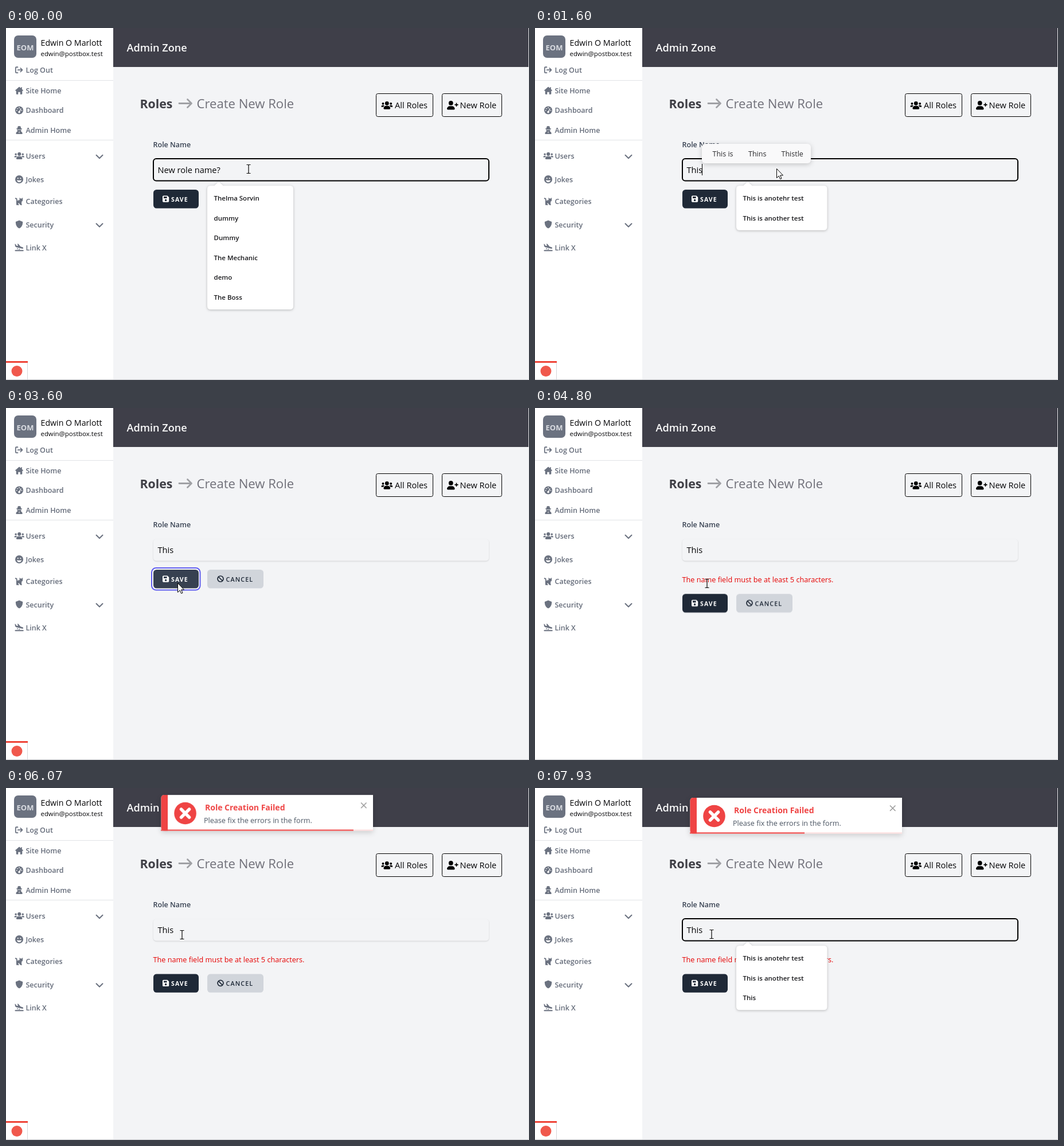
Recreate the animation shown at these times as an HTML page. Size 912x614 px, loop 8000 ms.

```html
<!DOCTYPE html>
<html lang="en">
<head>
<meta charset="utf-8">
<title>Create New Role</title>
<style>
html, body { margin: 0; width: 100%; height: 100%; overflow: hidden; background: #f3f4f6; }
svg { display: block; }
#stage { width: 912px; height: 614px; }
text { font: 400 14.6px "Open Sans", "Noto Sans", sans-serif; fill: #050507; }
.nav { fill: #6b7280; color: #6b7280; }
.nav text { font-weight: 600; font-size: 12.5px; fill: #656c7a; }
.line { fill: none; stroke: currentColor; stroke-width: 2; stroke-linecap: round; stroke-linejoin: round; }
.hole { fill: #fff; }
.list text { font-weight: 600; font-size: 11.5px; fill: #18181b; }
.bar text { font-size: 12.5px; fill: #2b2b2e; }
.btn text { font-weight: 700; font-size: 10.5px; letter-spacing: 1.1px; }
.panel { filter: drop-shadow(0 1px 2px rgba(0,0,0,.25)); }
.bar .panel { filter: drop-shadow(0 2px 4px rgba(0,0,0,.2)); }
.field { filter: drop-shadow(0 1px 1.2px rgba(0,0,0,.14)); }

.btn { animation: drop 8s step-end infinite; }
#save { animation: hover 8s linear infinite; }
#ring { animation: ring 8s linear infinite; }
#toast { animation: toast 8s linear infinite; filter: drop-shadow(0 3px 5px rgba(0,0,0,.16)); }
#left { transform-origin: 270px 0; animation: drain 8s linear infinite; }
#arrow { animation: point 8s linear infinite; }
#beam { animation: beam 8s linear infinite; }

@keyframes drop { 0% { transform: none; } 59.95% { transform: translateY(42.3px); } }
@keyframes hover {
  0%, 33% { fill: #1f2937; }
  35%, 36.6% { fill: #374151; }
  38.4% { fill: #1a2333; }
  40.8%, 59.94% { fill: #374151; }
  59.95%, 100% { fill: #1f2937; }
}
@keyframes ring {
  0%, 36.9% { opacity: 0; }
  39%, 59.94% { opacity: 1; }
  59.95%, 100% { opacity: 0; }
}
@keyframes toast {
  0%, 74.94% { opacity: 0; transform: translateY(-24px); }
  74.95% { opacity: .8; transform: translateY(-20px); }
  75.8% { opacity: 1; transform: translateY(-5.3px); }
  76.7% { opacity: 1; transform: translateY(-1.5px); }
  77.6%, 100% { opacity: 1; transform: none; }
}
@keyframes drain { 0%, 75% { transform: scaleX(341); } 100% { transform: scaleX(195); } }
@keyframes point {
  0%, 26.5% { transform: translate(421px, 245px); }
  27.5% { transform: translate(412px, 259px); }
  29% { transform: translate(383px, 318px); }
  30.4% { transform: translate(350px, 346px); }
  31.9% { transform: translate(318px, 339px); }
  33.1% { transform: translate(301px, 314px); }
  34%, 43.2% { transform: translate(297px, 305px); }
  45%, 100% { transform: translate(299px, 305px); }
}
@keyframes beam {
  0%, 50% { transform: translate(423px, 246px); }
  50.1%, 68.8% { transform: translate(300px, 306px); }
  70% { transform: translate(305px, 290px); }
  71.2% { transform: translate(312px, 266px); }
  72.5%, 88% { transform: translate(307px, 256px); }
  89%, 100% { transform: translate(308px, 255px); }
}
</style>
</head>
<body>
<svg id="stage" viewBox="0 0 912 614" xmlns="http://www.w3.org/2000/svg">
  <defs>
    <g id="users">
      <circle cx="3" cy="5" r="2"/><circle cx="17" cy="5" r="2"/><circle cx="10" cy="4.5" r="3.5"/>
      <path d="M4 13.5A4.6 4.6 0 0 1 8.6 9h2.8A4.6 4.6 0 0 1 16 13.5Q16 15 14.5 15H5.5Q4 15 4 13.5z"/>
      <path id="side" d="M0 11V10a2 2 0 0 1 2-2h2q1 0 1.6.6Q4 9.500 3.700 11z"/>
      <use href="#side" transform="matrix(-1 0 0 1 20 0)"/>
    </g>
    <path id="chevron" class="line" d="M-5.5-2.8 0 2.8 5.5-2.8"/>
    <path id="ibeam" d="M-3.5-7.5H-1Q0-7.5 0-6.5 0-7.5 1-7.5H3.5M0-6.5V6.5M-3.5 7.5H-1Q0 7.5 0 6.5 0 7.5 1 7.5H3.5"/>
  </defs>

  <rect width="912" height="614" fill="#f3f4f6"/>
  <rect x="187" width="724" height="68" fill="#3f3f49"/>
  <text x="210.5" y="41" style="font-weight:600;font-size:18.1px;fill:#fafafa">Admin Zone</text>

  <!-- sidebar -->
  <rect width="187" height="613" fill="#fff"/>
  <rect x="14" y="13" width="39" height="39" rx="7" fill="#6b7280"/>
  <text x="33.5" y="38.8" text-anchor="middle" style="font-weight:700;font-size:13px;fill:#d9dce1">EOM</text>
  <text x="60.5" y="31" style="font-size:14.2px">Edwin O Marlott</text>
  <text x="60.5" y="49" style="font-size:11.4px">edwin@postbox.test</text>
  <path d="M0 91.5h187M0 195.5h187" stroke="#e1e3e7"/>
  <g class="nav">
    <g transform="translate(15 66) scale(.9)"><path class="line" d="M6 2.5H3.5A1.5 1.5 0 0 0 2 4v8a1.5 1.5 0 0 0 1.5 1.5H6M6.5 8h8M11.5 4.5 15 8l-3.5 3.5"/></g>
    <text x="34.5" y="78">Log Out</text>
    <path transform="translate(16 102) scale(.88)" d="M8 .5 0 7.6 1.2 9 2 8.4v6.1a1.2 1.2 0 0 0 1.2 1.2H6V11h4v4.7h2.8a1.2 1.2 0 0 0 1.2-1.2V8.4l.8.6L16 7.6 13.5 5.4V1.5h-2v2z"/>
    <text x="34.5" y="113.5">Site Home</text>
    <g transform="translate(16 136.5) scale(.88)">
      <circle cx="8" cy="8" r="8"/>
      <g class="hole"><circle cx="8" cy="3" r="1"/><circle cx="4.3" cy="4.6" r="1"/><circle cx="3" cy="8.3" r="1"/><circle cx="13" cy="8.3" r="1"/><circle cx="8" cy="11.5" r="2"/><path d="M7.4 11 11 4l1.2.6-3.2 7z"/></g>
    </g>
    <text x="34.5" y="148">Dashboard</text>
    <g transform="translate(16 171) scale(.88)">
      <path d="M4.2 4.500 5.300 1C5.600.1 6.400-.2 7.200.2c.5.3 1.100.3 1.600 0 .8-.4 1.600-.1 1.900.8l1.100 3.500 2 .6V6H12v2c0 1-.3 1.800-.9 2.400 2 .6 3.300 2.400 3.300 4.400 0 .7-.5 1.200-1.200 1.200H2.800c-.7 0-1.200-.5-1.200-1.200 0-2 1.300-3.800 3.300-4.400C4.300 9.800 4 9 4 8V6H2.200v-.9z"/>
      <path class="hole" d="M5 6.800h2.500V8h-2zM8.500 6.800H11L10.500 8h-2zM7.200 11h1.600l-.8 4z"/>
    </g>
    <text x="34.5" y="183">Admin Home</text>
    <use href="#users" transform="translate(14.5 216) scale(.87)"/>
    <text x="34.5" y="228">Users</text>
    <g transform="translate(16 257) scale(.88)">
      <circle cx="8" cy="8" r="8"/>
      <g class="hole"><circle cx="5.4" cy="6" r="1.2"/><circle cx="10.6" cy="6" r="1.2"/><path d="M3.3 9.3c3 1 6.4 1 9.4 0-.4 2.6-2.4 4.200-4.700 4.200s-4.300-1.600-4.700-4.200z"/></g>
    </g>
    <text x="34.5" y="268.5">Jokes</text>
    <g transform="translate(15.5 295) scale(.9)">
      <path class="line" d="M1.3 2.500c1.700 0 2.400 1 2.400 2.500v8"/>
      <path d="M3 15.500V9.500C4 7 6 5.700 9 5.800V.8l2 2h2.200l2-2v4.700c0 1.700-1 2.800-2.200 3.200v5.300l1 1.500h-3l-3-3.500H6.500v2H8v1.500z"/>
    </g>
    <text x="34.5" y="307">Categories</text>
    <path transform="translate(16 335.5) scale(.88)" d="M8 0 15 2.800C15.200 9 13 13.500 8 16 3 13.500.8 9 1 2.800z"/>
    <text x="34.5" y="347.5">Security</text>
    <g transform="translate(15 376) scale(.9)">
      <path d="M.5.5 2 1l1.300 2.800 3.200.8L5.500.2l2 .5 4 5.200 3.500 1c1.300.4 2 1.300 1.800 2.200-.3.9-1.600 1-2.700.7L3.500 7.200C2 6.800 1.300 6 1 4.800z"/>
      <rect x=".5" y="12.600" width="17" height="2" rx="1"/><circle cx="5.500" cy="10" r="1"/><circle cx="9" cy="11" r="1"/>
    </g>
    <text x="34.5" y="388">Link X</text>
    <use href="#chevron" x="163" y="224.5"/><use href="#chevron" x="163" y="344"/>
  </g>

  <!-- page heading -->
  <text x="233.5" y="140" style="font-weight:700;font-size:21.3px;fill:#3f3f46">Roles</text>
  <path class="line" color="#a0a1a5" style="stroke-width:2.8" d="M302 131.500h21M316.500 124.500l7 7-7 7"/>
  <text x="332.5" y="140" style="font-size:22.1px;fill:#71717a">Create New Role</text>
  <g fill="none" stroke="#000"><rect x="645.5" y="114.5" width="99" height="40" rx="3"/><rect x="760.5" y="114.5" width="104" height="40" rx="3"/></g>
  <use href="#users" transform="translate(654.5 127) scale(.98)"/>
  <text x="678" y="140">All Roles</text>
  <g transform="translate(769 127) scale(.97)">
    <circle cx="7" cy="4" r="4"/>
    <path d="M0 14.500A5 5 0 0 1 5 9.500h4a5 5 0 0 1 5 5Q14 16 12.500 16h-11Q0 16 0 14.500z"/>
    <path class="line" style="stroke-width:1.8" d="M17 4.500v5M14.500 7h5"/>
  </g>
  <text x="791.5" y="140">New Role</text>

  <!-- form -->
  <text x="256.5" y="207.5" style="font-weight:600;font-size:12.5px;fill:#374151">Role Name</text>
  <rect class="field" data-on="2930-7270" x="257" y="229" width="585" height="37.5" rx="5" fill="#f3f4f6"/>
  <rect data-on="0-2930 7270-8000" x="257" y="228" width="585" height="38.5" rx="5" fill="#f3f4f6" stroke="#000" stroke-width="2"/>
  <g id="typed"></g>
  <text data-on="4800-8000" x="256.5" y="304" style="font-size:12.66px;fill:#e60000">The name field must be at least 5 characters.</text>
  <g class="btn">
    <rect id="ring" x="254" y="279" width="84.500" height="38.500" rx="7.500" fill="#fff" stroke="#5f5cf0" stroke-width="2"/>
    <rect id="save" x="257" y="282" width="79" height="32.500" rx="5.500" fill="#1f2937"/>
    <path transform="translate(273 292.5) scale(.8)" fill="#fff" fill-rule="evenodd" d="M0 2Q0 0 2 0h8.500L14 3.500V12q0 2-2 2H2q-2 0-2-2zM2.500 2v3.500h7V2zM7 7.500a2.200 2.200 0 1 0 .01 0z"/>
    <text x="288" y="302.7" style="fill:#fff">SAVE</text>
    <rect x="351" y="282" width="98" height="32.5" rx="5.5" fill="#d1d5db"/>
    <g fill="none" stroke="#1f2937" stroke-width="1.7"><circle cx="374" cy="298" r="5"/><path d="M370.5 294.5l7 7"/></g>
    <text x="383.5" y="302.7" style="font-weight:600;font-size:10.8px;fill:#1f2937">CANCEL</text>
  </g>

  <!-- debug badge -->
  <g data-on="0-4800 5200-8000">
    <rect y="581" width="38" height="32" fill="#fff"/>
    <path d="M37.5 584v29" stroke="#d6d6d8"/>
    <rect y="581" width="38" height="3" fill="#ee4438"/>
    <circle cx="19" cy="598.5" r="9.5" fill="#f0584c"/>
  </g>
  <rect y="613" width="912" height="1" fill="#c6c7ca"/>
  <rect x="911" width="1" height="614" fill="#e6e7e9"/>

  <g id="popups"></g>

  <g id="toast">
    <path d="M276 17H640V79.500H276Q270.500 79.500 270.500 74V22.500Q270.500 17 276 17z" fill="#fff"/>
    <path d="M282 17V79.500H276Q270.500 79.500 270.500 74V22.500Q270.500 17 276 17z" fill="#ef4444"/>
    <rect x="282" y="77.5" width="358" height="2" fill="#fcdcdc"/>
    <rect id="left" x="270" y="77.5" width="1" height="2" fill="#ef4444"/>
    <circle cx="312.5" cy="49" r="19.3" fill="#ef4444"/>
    <path d="M305.5 42l14 14M319.5 42l-14 14" stroke="#fff" stroke-width="5.5" stroke-linecap="round"/>
    <text x="347" y="44" style="font-weight:700;font-size:14px;fill:#ef4444">Role Creation Failed</text>
    <text x="345" y="65.5" style="font-size:12.6px;fill:#4b5563">Please fix the errors in the form.</text>
    <path d="M619 30.5l9.5 9.5M628.5 30.5l-9.5 9.5" stroke="#999" stroke-width="1.5"/>
  </g>

  <g data-on="270-4800"><g id="arrow">
    <path d="M.5.5V16.5L4.2 13 6.6 18.5 9 17.5 6.6 12H11.5z" fill="#fff" stroke="#000"/>
  </g></g>
  <g data-on="0-270 4800-8000"><g id="beam" fill="none">
    <use href="#ibeam" stroke="#fff" stroke-width="2.6" opacity=".7"/>
    <use href="#ibeam" stroke="#000" stroke-width="1.2"/>
  </g></g>
</svg>

<script>
const LOOP = 8000;
const $ = id => document.getElementById(id);
const text = (x, y, s) => `<text x="${x}" y="${y}">${s}</text>`;

const typed = (on, s) => `<g data-on="${on}">${text(264.5, 253, s)}</g>`;
const caret = (on, x) => `<rect data-on="${on}" x="${x}" y="237" width="1" height="20"/>`;

// autofill list below the field
function list(on, right, rows, items) {
  const bottom = 283.5 + rows * 34.6;
  return `<g class="list" data-on="${on}">
    <path class="panel" fill="#fff" d="M357 275H363.5L371 268 378.5 275H${right - 6}q6 0 6 6V${bottom - 6}q0 6-6 6H357q-6 0-6-6V281q0-6 6-6z"/>
    ${items.map((s, i) => text(362.5, 301 + i * 34.6, s)).join('')}</g>`;
}

// word suggestions beside the caret
function bar(on, x, width, words, offsets) {
  return `<g class="bar" data-on="${on}">
    <rect class="panel" x="${x}" y="202" width="${width}" height="34" rx="6" fill="#f9f9fa"/>
    ${words.map((s, i) => text(x + offsets[i], 224, s)).join('')}</g>`;
}

$('typed').innerHTML =
  typed('0-70', 'New role name?') + typed('70-330', 'T') + typed('330-470', 'Th') +
  typed('470-540', 'Thi') + typed('540-8000', 'This') +
  caret('70-330', 273) + caret('330-470', 282) + caret('470-540', 286) +
  caret('540-1070 1600-2130 2660-2930 7270-7800', 291);

const people = ['Thelma Sorvin', 'The Mechanic', 'The Boss'];
const tests = ['This is anotehr test', 'This is another test'];
$('popups').innerHTML =
  list('0-130', 501, 6, [people[0], 'dummy', 'Dummy', people[1], 'demo', people[2]]) +
  list('130-270', 501, 6, people) +
  list('270-600', 509.5, 6, [...people, ...tests, 'Test']) +
  list('600-3000', 509.5, 2, tests) +
  list('7270-8000', 509.5, 3, [...tests, 'This']) +
  bar('270-470', 273, 166, ['The', 'This', 'That'], [19, 69, 121]) +
  bar('470-730', 286, 185, ['This', 'Thing', 'Think'], [19, 71, 131]) +
  bar('730-2930', 291, 190, ['This is', 'Thins', 'Thistle'], [18.5, 81, 138.5]);

// turn "from-to" spans into stepped keyframes
let css = '';
document.querySelectorAll('[data-on]').forEach((el, i) => {
  const stops = new Map([[0, 0]]);
  for (const span of el.dataset.on.split(' ')) {
    const [from, to] = span.split('-').map(Number);
    stops.set(from, 1);
    if (to < LOOP) stops.set(to, 0);
  }
  const steps = [...stops].map(([t, v]) => `${Math.max(0, t - 4) / LOOP * 100}%{opacity:${v}}`);
  css += `@keyframes on${i}{${steps.join('')}}`;
  el.style.animation = `on${i} ${LOOP}ms step-end infinite`;
});
document.head.appendChild(document.createElement('style')).textContent = css;
</script>
</body>
</html>
```
